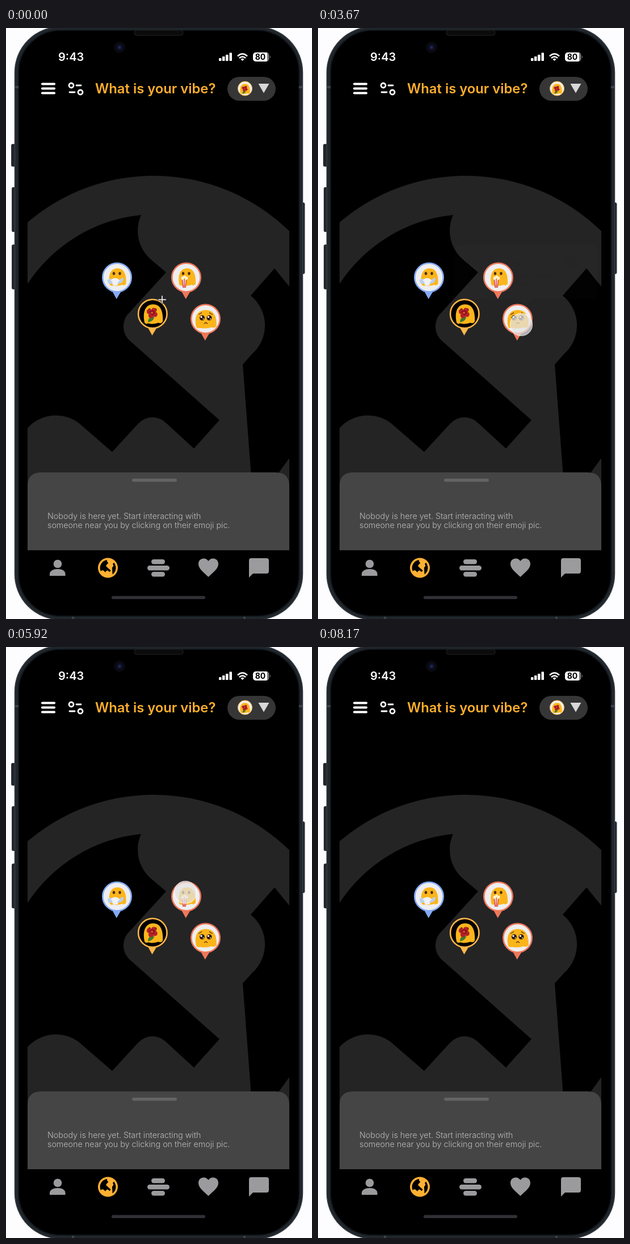
These frames come from a looping animation (539 px wide and 1040 px high, 8.83 s). An HTML page:

```html
<!DOCTYPE html>
<html lang="en">
<head>
<meta charset="utf-8">
<title>Vibe map</title>
<style>
  html, body { margin: 0; width: 100%; height: 100%; overflow: hidden; background: #fdfdff; }
  svg { display: block; width: 100%; height: 100%; }
  text { font-family: Inter, Roboto, sans-serif; white-space: pre; }
</style>
</head>
<body>
<svg id="stage" viewBox="0 0 539 1040">
  <defs>
    <clipPath id="screen"><rect x="38" y="140" width="461" height="779"/></clipPath>
    <path id="blob" d="M-14 12C-17-5-11-15 0-15S16-5 15 12Q13 16 8 14Q0 17-8 15Q-13 17-14 12Z" fill="#fbb51b"/>
    <g id="rose">
      <path d="M-7 12Q-3 4 4 7Q2 14-7 16Z" fill="#3f7a2c"/>
      <g fill="#b3202b">
        <circle cx="-5" cy="-3" r="4.500"/><circle cx="3" cy="-5" r="4.500"/>
        <circle cx="5" cy="2" r="4.500"/><circle cx="-2" cy="4" r="4.500"/>
      </g>
      <path d="M-5-1Q0-7 4-2Q2 4-2 1" fill="none" stroke="#7a1018" stroke-width="1.500"/>
    </g>
  </defs>

  <!-- phone body -->
  <g fill="#20262b" stroke="#363d43">
    <rect x="9.500" y="204.500" width="7" height="39" rx="2"/>
    <rect x="10.500" y="280.500" width="7" height="78" rx="2"/>
    <rect x="10.500" y="381.500" width="7" height="78" rx="2"/>
    <rect x="520" y="307.500" width="6" height="125" rx="2"/>
    <rect x="15.500" y="-2" width="507" height="1043" rx="80" stroke-width="1.500"/>
  </g>
  <rect x="22" y="4" width="494.500" height="1031" rx="74" stroke="#11171c" stroke-width="2"/>
  <path d="M16 104h6M516 104h6M118 1036v5M420 1036v5" stroke="#3b444b" stroke-width="4"/>
  <rect x="226" y="4" width="86" height="9" rx="4" fill="#0b0b0b" stroke="#222"/>
  <circle cx="200" cy="34" r="10" fill="#090910"/>
  <circle cx="200" cy="34" r="5" fill="#11142f"/>
  <circle cx="200" cy="34" r="2" fill="#222a60"/>

  <!-- status bar -->
  <g fill="#fff">
    <text x="92" y="58" font-size="20" font-weight="600">9:43</text>
    <rect x="375" y="53" width="4.500" height="5" rx="1"/>
    <rect x="381" y="50" width="4.500" height="8" rx="1"/>
    <rect x="387" y="47" width="4.500" height="11" rx="1"/>
    <rect x="393.500" y="43.500" width="4.500" height="14.500" rx="1"/>
    <path d="M413.500 55Q416.500 52 419.500 55L416.500 58Z"/>
    <path d="M408 49.500Q416.500 41.500 425 49.500M411 53Q416.500 48 422 53" fill="none" stroke="#fff" stroke-width="2.600"/>
    <rect x="435" y="43" width="28" height="16" rx="5"/>
    <path d="M460 43.500q3.500 1 3.500 5v5q0 4-3.500 5z" fill="#777"/>
    <path d="M465 48.500q2 2.500 0 5z" fill="#888"/>
    <text x="448" y="56" font-size="14" font-weight="700" fill="#000" text-anchor="middle">80</text>
  </g>

  <!-- header -->
  <path d="M64 98.500H85M64 106.500H85M64 114.500H85" stroke="#fff" stroke-width="4.200" stroke-linecap="round"/>
  <g fill="none" stroke="#fff" stroke-width="2.800" stroke-linecap="round">
    <circle cx="115" cy="101" r="4"/><path d="M124 101H132M112 113H121"/><circle cx="131" cy="113" r="4"/>
  </g>
  <text x="157" y="115" font-size="23.800" font-weight="600" fill="#ffaf2d">What is your vibe?</text>
  <rect x="390" y="86" width="85" height="42" rx="21" fill="#363637"/>
  <circle cx="421" cy="106.500" r="12.500" fill="#f4efe6" stroke="#ffb94d"/>
  <use href="#blob" transform="translate(421 107) scale(.58)"/>
  <use href="#rose" transform="translate(420.500 107) scale(.54)"/>
  <path d="M444.500 98H463.500L454 114.500Z" fill="#d8d8d8"/>

  <!-- map -->
  <g clip-path="url(#screen)">
    <circle cx="260" cy="602" r="342" fill="#242425"/>
    <path d="M38 450A272 272 0 0 1 238 329A67 67 0 0 0 256 408L282 430L218 500A34 34 0 0 0 220 552L376 690L331 740L283 696A34 34 0 0 0 233 696L187 746L135 701A67 67 0 0 0 38 704Z"/>
    <path d="M499 455L473 423L431 471A67 67 0 0 1 434 573L417 592L432 790H475L499 757Z"/>
  </g>
  <g id="pins"></g>

  <!-- sheet -->
  <path d="M38 919V806Q38 782 62 782H475Q499 782 499 806V919Z" fill="#454546"/>
  <rect x="222" y="793" width="79" height="5.500" rx="2.700" fill="#646465"/>
  <g font-size="14.300" font-weight="300" fill="#bcbcbc">
    <text x="73" y="864">Nobody is here yet. Start interacting with</text>
    <text x="73" y="880">someone near you by clicking on their emoji pic.</text>
  </g>

  <!-- tab bar -->
  <g fill="#9b9b9e">
    <circle cx="91" cy="943" r="7.300"/>
    <path d="M77 964V960Q79 952 91 952T104.500 960V964Z"/>
    <rect x="256" y="935" width="24" height="8.500" rx="4.200"/>
    <rect x="249" y="946" width="39" height="8.500" rx="4.200"/>
    <rect x="256" y="957" width="24" height="8.500" rx="4.200"/>
    <path d="M356.500 966C346 956 339 951 339 943C339 933 351 930 356.500 938C362 930 374 933 374 943C374 951 367 956 356.500 966Z"/>
    <path d="M432 933H459Q463 933 463 937V956Q463 960 459 960H435L428 967V937Q428 933 432 933Z"/>
  </g>
  <g transform="translate(179.500 950) rotate(-138) scale(1.750)">
    <circle r="10" fill="#ffb032"/>
    <path d="M-1 7.930A8 8 0 0 1-7.790-1.790L-3 3V4A2 2 0 0 0-1 6ZM5.900 5.390A2 2 0 0 0 4 4H3V1A1 1 0 0 0 2 0H-4V-2H-2A1 1 0 0 0-1-3V-5H1A2 2 0 0 0 3-7V-7.410A8 8 0 0 1 5.900 5.390Z"/>
  </g>
  <rect x="186" y="999.500" width="165" height="5.500" rx="2.700" fill="#303036"/>

  <g id="cards"></g>
  <g id="touch">
    <circle r="19.500" fill="#e4e4e4"/>
    <circle r="19.500" fill="none" stroke="#fff" stroke-width="1.300"/>
  </g>
  <g id="cross" stroke-linecap="square">
    <path d="M-6 0H6M0-6V6" stroke="#333" stroke-width="3.500"/>
    <path d="M-6 0H6M0-6V6" stroke="#fff" stroke-width="1.500"/>
  </g>
</svg>
<script>
const LOOP = 8830;
const $ = id => document.getElementById(id);

const eyes = '<g fill="#4a2b10"><ellipse cx="-5.500" cy="-7" rx="2.200" ry="2.800"/><ellipse cx="5" cy="-7" rx="2.200" ry="2.800"/></g>';
const blob = (x, y, sx = 1, sy = sx) => `<use href="#blob" transform="translate(${x} ${y}) scale(${sx} ${sy})"/>`;

const faces = {
  tissue: blob(1, -1) + eyes +
    `<path d="M-17 5Q-13 0-7 4H5Q9-1 12 2L9 9L3 11H-8L-15 11Z" fill="#bcd0ee"/>
     <path d="M-11 5Q-6-1 1 2L5 5L1 9L2 13Q-5 16-8 12L-8 8Z" fill="#f1f2f6"/>`,
  popcorn: blob(1.5, -1) + eyes +
    `<path d="M-8 3H1L-1 18H-6Z" fill="#fff"/>
     <path d="M-7 4L-5.500 18M-3.500 3V18M0 4L-1.500 18" stroke="#d83a35" stroke-width="1.600"/>
     <g fill="#fff3d2"><circle cx="-6.500" cy="1" r="2.500"/><circle cx="-3" cy="-1" r="2.500"/><circle cx=".5" cy="1" r="2.500"/></g>`,
  rose: blob(1, 0, 1.12) + eyes + '<use href="#rose" transform="translate(-1-1)"/>',
  sad: blob(.5, 0, 1.24, 1.05) +
    `<g fill="#2a1608"><circle cx="-6" cy="-2" r="4.500"/><circle cx="6.500" cy="-2" r="4.500"/></g>
     <g fill="#fff"><circle cx="-7.500" cy="-3.500" r="1.700"/><circle cx="5" cy="-3.500" r="1.700"/><circle cx="-4" cy="0" r="1"/><circle cx="8.500" cy="0" r="1"/></g>
     <path d="M-12-8Q-9-9-7-11M12-8Q9-9 7-11M-2 8Q.5 5 3 8" fill="none" stroke="#5a3210" stroke-width="1.300" stroke-linecap="round"/>`
};

const pin = (x, y, color, face, bg = '#eeeef0') =>
  `<g transform="translate(${x} ${y})"><path d="M-8.500 24H7.500L-.8 38Z" fill="${color}"/>
   <circle r="25.200" fill="${bg}" stroke="${color}" stroke-width="2.600"/>${faces[face]}</g>`;

$('pins').innerHTML =
  pin(195.5, 439, '#83a9f6', 'tissue') + pin(317.5, 439, '#f0775a', 'popcorn') +
  pin(258.3, 503, '#ffb74a', 'rose', '#000') + pin(351.5, 512, '#f0775a', 'sad');

// times: fade-in start and end, fade-out start and end
const cards = [
  { x: 241, y: 381, w: 250, h: 96, tip: 125, name: 'Tivi, 25', far: '0.3 miles',
    lines: ['“Looking for someone to paint', 'the town red together”'], times: [3670, 3970, 4420, 4750] },
  { x: 214, y: 316, w: 240, h: 94, tip: 119, name: 'Mozzet, 20', far: '0.5 miles',
    lines: ['“Looking for someone to watch', 'Seldom On A Monday together”'], times: [6250, 6580, 7080, 7500] }
];

$('cards').innerHTML = cards.map(c =>
  `<g transform="translate(${c.x} ${c.y})">
     <path d="M${c.tip - 11} ${c.h}h22l-11 10z" fill="#fff"/>
     <rect width="${c.w}" height="${c.h}" rx="8" fill="#fcfbff" fill-opacity=".975"/>
     <text x="19" y="37" font-size="15" font-weight="600" fill="#333338">${c.name}<tspan dx="7" font-size="10.800" fill="#929297">${c.far}</tspan></text>
     <g font-size="11" letter-spacing="-.2" fill="#39393d">${c.lines.map((s, i) => `<text x="19" y="${59 + 14 * i}">${s}</text>`).join('')}</g>
     <path transform="translate(191.500 18.500) scale(1.280 1.120)" fill="#f5a937" d="M21 6h-2v9H6v2q0 1 1 1h11l4 4V7q0-1-1-1zM17 12V3q0-1-1-1H3q-1 0-1 1v14l4-4h10q1 0 1-1z"/>
   </g>`).join('');

// pointer path: time, x, y, touch opacity (0 shows the crosshair)
const path = [
  [0, 275, 478, 0], [80, 275, 478, 0], [250, 327, 458, 0], [500, 239, 525, 0], [670, 251, 508, 0],
  [1500, 251, 508, 0], [1800, 290, 434, 0], [2330, 361, 523, 0],
  [2500, 358, 522, .74], [3080, 358, 522, 0], [3250, 358, 522, .74], [4640, 358, 522, .74],
  [4900, 346, 609, .43], [5080, 329, 678, 0], [5250, 329, 678, 0], [5670, 316, 432, 0],
  [5830, 316, 432, .74], [6580, 316, 429, .74], [7500, 316, 429, .74], [7750, 302, 629, .43], [8000, 302, 629, 0]
];

const clamp = v => Math.min(1, Math.max(0, v));
const easeOut = v => 1 - (1 - v) ** 2;
const ramp = (t, a, b) => easeOut(clamp((t - a) / (b - a)));

function drawPointer(t) {
  const i = path.findLastIndex(k => k[0] <= t);
  const a = path[i], b = path[i + 1] || a;
  const same = !a[3] === !b[3];
  const p = same && b !== a ? (t - a[0]) / (b[0] - a[0]) : 0;
  const [, x, y, op] = a.map((v, j) => v + (b[j] - v) * p);
  for (const id of ['touch', 'cross']) $(id).setAttribute('transform', `translate(${x} ${y})`);
  $('touch').style.opacity = op;
  $('cross').style.opacity = op || t >= 8000 ? 0 : 1;
}

function draw(t) {
  cards.forEach(({ times: [a, b, c, d] }, i) => {
    $('cards').children[i].style.opacity = ramp(t, a, b) * (1 - ramp(t, c, d));
  });
  drawPointer(t);
}

const start = performance.now();
function tick() {
  draw((performance.now() - start) % LOOP);
  requestAnimationFrame(tick);
}
tick();
</script>
</body>
</html>
```
